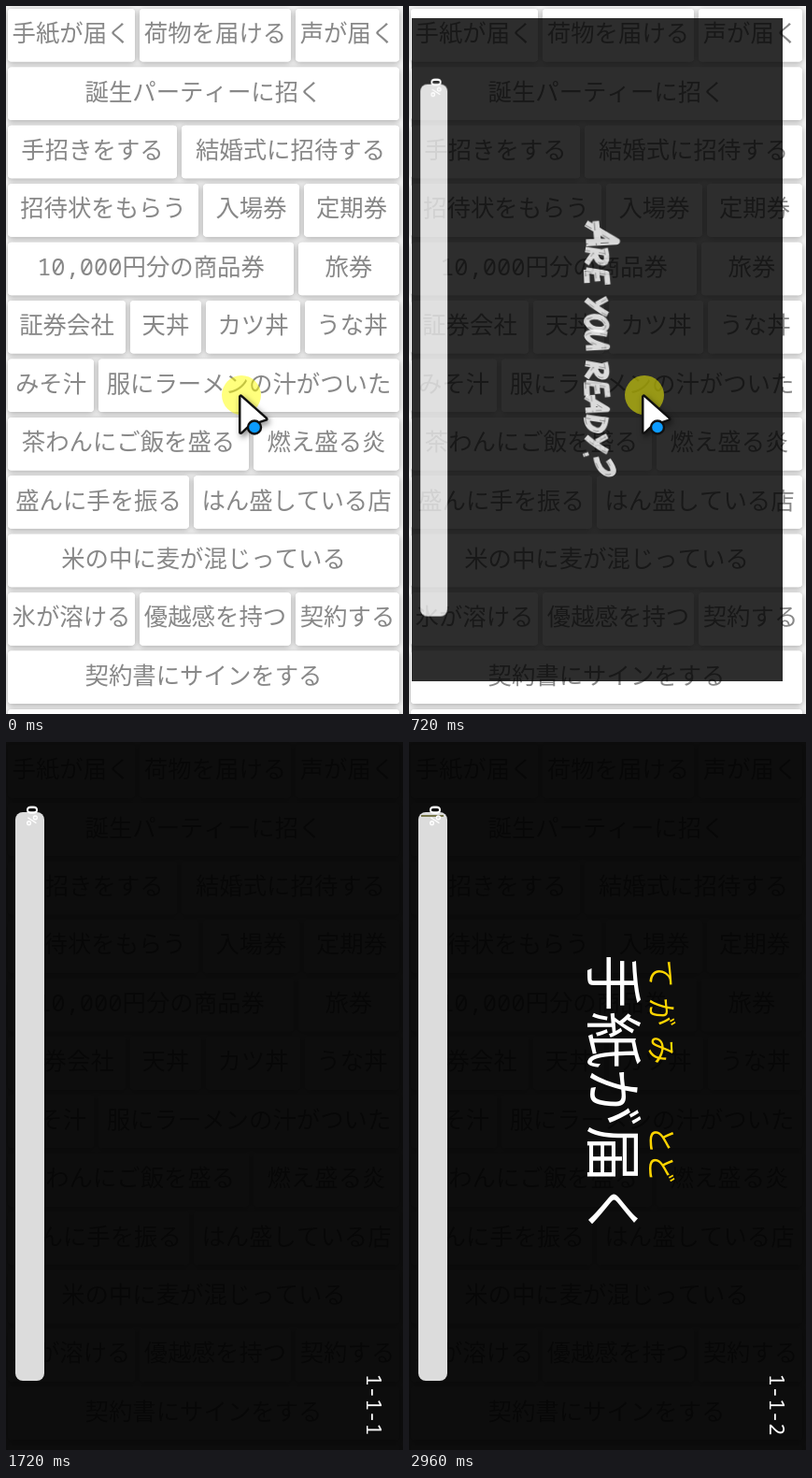
Animation, 425 px wide and 757 px high, one loop 3440 ms. Source, as an HTML page with a canvas:

```html
<!DOCTYPE html>
<html lang="ja">
<head>
<meta charset="utf-8">
<title>Are you ready?</title>
<style>
html, body { margin: 0; width: 100%; height: 100%; overflow: hidden; background: #f2f2f2; }
canvas { display: block; width: 425px; height: 757px; }
</style>
</head>
<body>
<canvas id="stage" width="425" height="757" aria-label="Are you ready? 手紙が届く"></canvas>
<script>
const W = 425, H = 757, LOOP = 3440;
const CX = 212.5, CY = 378.5;
const FONT = '"Noto Sans Mono", "Noto Sans CJK JP", "Noto Sans CJK", sans-serif';

// Each row: right edges of its buttons, then their labels
const rows = [
  [[138, 305, 421], '手紙が届く', '荷物を届ける', '声が届く'],
  [[421], '誕生パーティーに招く'],
  [[183, 421], '手招きをする', '結婚式に招待する'],
  [[206, 314, 421], '招待状をもらう', '入場券', '定期券'],
  [[308, 421], '10,000円分の商品券', '旅券'],
  [[128, 209, 315, 421], '証券会社', '天丼', 'カツ丼', 'うな丼'],
  [[94, 421], 'みそ汁', '服にラーメンの汁がついた'],
  [[260, 421], '茶わんにご飯を盛る', '燃え盛る炎'],
  [[196, 421], '盛んに手を振る', 'はん盛している店'],
  [[421], '米の中に麦が混じっている'],
  [[138, 305, 421], '氷が溶ける', '優越感を持つ', '契約する'],
  [[421], '契約書にサインをする'],
  [[421], '']
];

const beats = [0, 480, 520, 600, 680, 720, 800, 840, 920, 1000,
  1080, 1160, 1200, 1280, 1360, 1400, 1480,
  1680, 1760, 1800, 1880, 1920, 2000, 2080, 2120, 2200,
  2280, 2320, 2400, 2480, 2520, 2600, 2680, 2720, 2800, 2880, 2960];

// Brush letters on a baseline at 0, about 48 high
const glyphs = {
  A: 'M3-3L27-44L29-3M0-16L31-19',
  R: 'M5-3L12-44M3-40Q32-48 30-34Q28-24 10-20L32-5',
  E: 'M7-4L13-43L34-45M10-24L28-26M6-5L31-6',
  Y: 'M5-44L16-24M35-45Q24-24 7-4',
  O: 'M18-42Q6-36 6-20Q8-2 18-6Q32-14 30-34Q28-46 18-42Z',
  U: 'M8-44Q0-6 11-6Q22-8 32-44L34-4',
  D: 'M6-4L12-44M6-42Q36-38 30-22Q26-6 6-5',
  '?': 'M13-46Q42-66 39-44Q34-28 8-23M0-3L6-5'
};
const shapes = {};
for (const k in glyphs) shapes[k] = new Path2D(glyphs[k]);
const line = 'AREYOUREADY?';
const lineAt = [137, 185, 222, 277, 310, 341, 399, 433, 463, 499, 535, 572];

const clamp = v => Math.max(0, Math.min(1, v));

// Standard CSS "ease" curve
function ease(x) {
  x = clamp(x);
  let lo = 0, hi = 1;
  for (let i = 0; i < 24; i++) {
    const m = (lo + hi) / 2;
    if (0.75 * m * (1 - m) + m * m * m < x) lo = m; else hi = m;
  }
  const s = 1 - lo;
  return 0.3 * s * s * lo + 3 * s * lo * lo + lo * lo * lo;
}

function layer() {
  const c = document.createElement('canvas');
  c.width = W;
  c.height = H;
  return c.getContext('2d');
}

function box(c, x, y, w, h, r) {
  c.beginPath();
  c.roundRect(x, y, w, h, r);
  c.fill();
}

// Text centred on (x, y) by its ideographic square
function label(c, text, x, y, size, color, weight = 400) {
  c.font = `${weight} ${size}px ${FONT}`;
  c.textAlign = 'center';
  c.fillStyle = color;
  c.fillText(text, x, y + size * 0.38);
}

function turned(c, x, y, draw) {
  c.save();
  c.translate(x, y);
  c.rotate(Math.PI / 2);
  draw();
  c.restore();
}

function eachButton(draw) {
  rows.forEach(([edges, ...words], r) => {
    let x = 2;
    edges.forEach((right, i) => {
      draw(x, 3 + r * 62.42, right - x, words[i]);
      x = right + 5;
    });
  });
}

function makePage() {
  const c = layer();
  c.fillStyle = '#f2f2f2';
  c.fillRect(0, 0, W, H);
  c.fillStyle = '#fff';
  c.shadowColor = 'rgba(0,0,0,.3)';
  c.shadowBlur = 6;
  c.shadowOffsetY = 1.5;
  eachButton((x, y, w) => box(c, x, y, w, 56.5, 4));
  c.shadowColor = 'transparent';
  eachButton((x, y, w, word) => {
    c.fillStyle = '#fff';
    box(c, x, y, w, 56.5, 4);
    label(c, word, x + w / 2, y + 25.5, 25.4, '#888');
  });
  return c.canvas;
}

const ctx = document.getElementById('stage').getContext('2d');
const page = makePage();
const sheet = layer();

// Scale from 0.3 over one second, fade in over the first half
function zoomIn(c, age, draw) {
  const s = 0.3 + 0.7 * ease(age / 1000);
  c.globalAlpha = ease(age / 500);
  turned(c, CX, CY, () => {
    c.scale(s, s);
    draw();
  });
  c.globalAlpha = 1;
}

function drawReady(c) {
  c.lineJoin = 'round';
  [...line].forEach((ch, i) => {
    c.save();
    c.translate(lineAt[i] - CY, CX - 187);
    if (i === 0) c.scale(1.4, 1.4);
    c.lineCap = 'butt';
    c.strokeStyle = '#fff';
    c.lineWidth = i ? 10.5 : 9;
    c.stroke(shapes[ch]);
    // dry brush streaks
    c.translate(1.5, 2);
    c.strokeStyle = '#0d0d0d';
    c.lineWidth = 0.8;
    c.setLineDash([11, 17]);
    c.stroke(shapes[ch]);
    c.restore();
  });
}

function drawPhrase(c) {
  const em = 61, gold = '#ffd500';
  [...'手紙が届く'].forEach((ch, i) => label(c, ch, 1 + (i - 2) * em, -6.5, em, '#fff'));
  [...'てがみ'].forEach((ch, i) => label(c, ch, -90 + (i - 1) * em * 2 / 3, -58.5, em / 2, gold));
  [...'とど'].forEach((ch, i) => label(c, ch, 62 + (i - 0.5) * em / 2, -58.5, em / 2, gold));
}

function drawSheet(t) {
  const c = sheet;
  c.clearRect(0, 0, W, H);
  c.fillStyle = 'rgba(0,0,0,.95)';
  c.fillRect(0, 0, W, H);

  c.fillStyle = '#dcdcdc';
  box(c, 10, 75, 31, 608, 8);
  c.fillStyle = '#77774a';
  c.fillRect(13, 78, 24, 2 * ease((t - 2240) / 720));
  turned(c, 28, 79, () => {
    c.font = '700 17px Roboto, sans-serif';
    c.textAlign = 'center';
    c.fillStyle = '#fff';
    c.fillText('0%', 0, 6.5);
  });

  if (t < 1680) {
    zoomIn(c, t - 455, () => drawReady(c));
  } else {
    zoomIn(c, t - 1700, () => drawPhrase(c));
    turned(c, 385.5, 708.5, () => {
      c.font = '22px "Noto Sans Mono", monospace';
      c.textAlign = 'center';
      c.fillStyle = '#fff';
      c.fillText(t < 2280 ? '1-1-1' : '1-1-2', 0, 0);
    });
  }
}

function drawPointer(t) {
  if (t < 1080) {
    ctx.fillStyle = 'rgba(255,255,0,.51)';
    ctx.beginPath();
    ctx.arc(252, 416, 21, 0, 7);
    ctx.fill();
  }
  if (t >= 1680) return;
  const arrow = new Path2D('M251.5 418L251.5 455.5L260 447.5L278 441.5Z');
  ctx.save();
  ctx.lineJoin = 'round';
  ctx.strokeStyle = '#111';
  ctx.lineWidth = 5;
  ctx.shadowColor = 'rgba(0,0,0,.5)';
  ctx.shadowBlur = 6;
  ctx.shadowOffsetX = 2;
  ctx.shadowOffsetY = 3;
  ctx.stroke(arrow);
  ctx.shadowColor = 'transparent';
  ctx.fillStyle = '#fff';
  ctx.fill(arrow);
  ctx.beginPath();
  ctx.arc(266, 450.5, 7, 0, 7);
  ctx.fillStyle = '#0c9bff';
  ctx.fill();
  ctx.lineWidth = 2.4;
  ctx.stroke();
  ctx.restore();
}

function draw(time) {
  const t = beats.filter(b => b <= time).pop();
  ctx.drawImage(page, 0, 0);
  const p = ease((t - 467) / 436);
  if (p > 0) {
    drawSheet(t);
    const s = 0.5 + 0.5 * p, shift = 169 * (1 - s);
    ctx.globalAlpha = p;
    ctx.drawImage(sheet.canvas, CX - shift - W * s / 2, CY - shift - H * s / 2, W * s, H * s);
    ctx.globalAlpha = 1;
  }
  drawPointer(t);
}

const start = performance.now();
function tick() {
  draw((performance.now() - start) % LOOP);
  requestAnimationFrame(tick);
}
tick();
</script>
</body>
</html>
```
